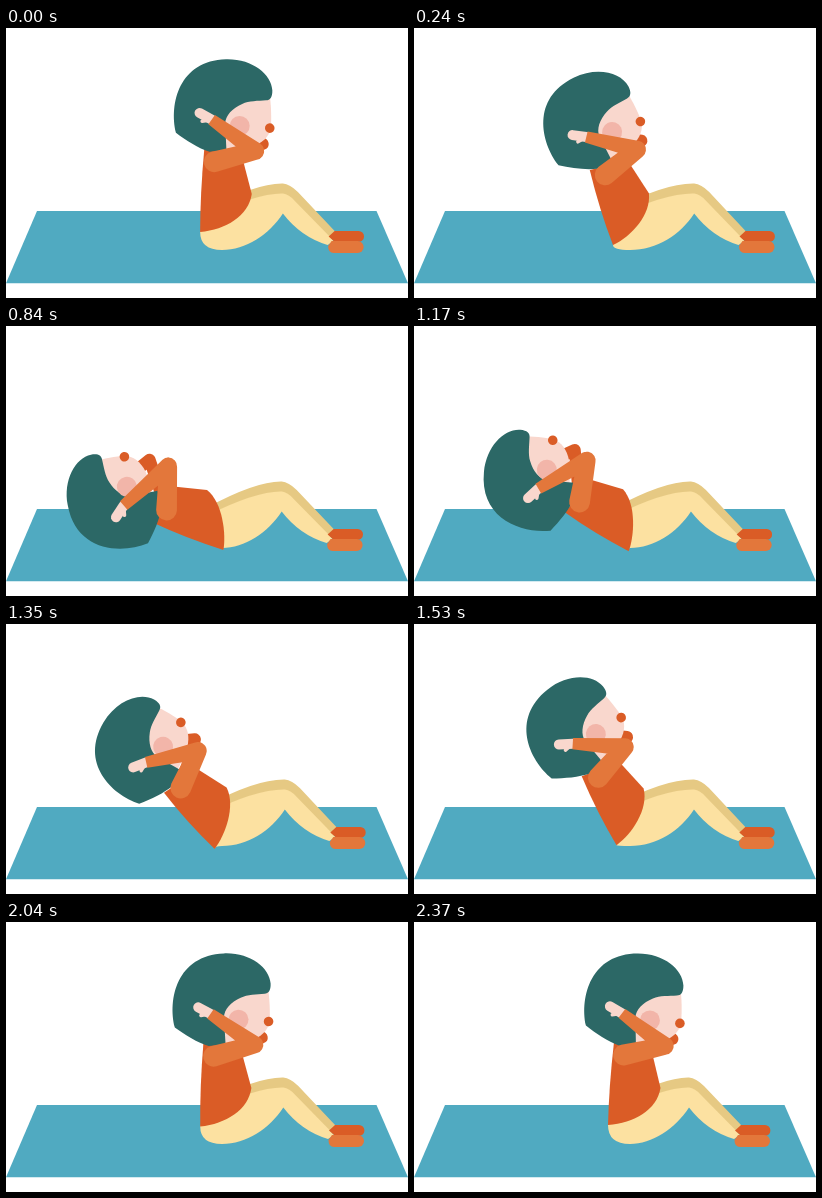
These frames come from a looping animation (402 px wide and 270 px high, 2.4 s). An HTML page:

```html
<!DOCTYPE html>
<html lang="en">
<head>
<meta charset="utf-8">
<title>Sit-ups</title>
<style>
  html, body { margin: 0; width: 100%; height: 100%; overflow: hidden; background: #fff; }
  svg { display: block; width: 100%; height: 100%; }
  .mat { fill: #50aac1; }
  .hair { fill: #2c6866; }
  .skin { fill: #f9d7cd; }
  .blush { fill: #f2b5a9; }
  .dark { fill: #da5c26; }
  .light { fill: #e3773b; }
  .shade { fill: #e6c983; }
  .cloth { fill: #fce1a1; }
  .line { fill: none; stroke-linejoin: round; }
  #far { stroke: #da5c26; stroke-width: 12; }
  #hand, #thumb { stroke: #f9d7cd; stroke-linecap: round; }
  #hand { stroke-width: 10; }
  #thumb { stroke-width: 3.5; }
</style>
</head>
<body>
<svg viewBox="0 0 402 270" preserveAspectRatio="none">
  <path class="mat" d="M31 183H370.5L402 255.3H0Z"/>
  <path id="backLeg" class="shade"/>
  <path id="frontLeg" class="cloth"/>
  <g id="feet">
    <path class="dark" d="M0 208.5L6 203H30a5.4 5.4 0 0 1 0 10.8H6Z"/>
    <path class="light" d="M3 213H29a6 6 0 0 1 0 12H5Q-.5 225 -.5 218Z"/>
  </g>
  <path id="far" class="line"/>
  <path id="torso" class="dark"/>
  <!-- head is drawn around the cheek -->
  <g id="head">
    <path class="skin" d="M-18 -28H31C32 -18 32 -5 31 3C29 12 22 18 12 21C4 23 -6 24 -16 24Z"/>
    <path id="hair" class="hair" d="M-64 5C-70 -24 -59 -67 -12 -67C14 -67 33 -51 33.5 -35C33.5 -28 31 -25 27 -25C19 -24.5 10 -25 3 -22C-7 -18 -14 -11 -14.5 -3L-14 24L-31 25C-42 21 -54 13 -64 5Z"/>
    <circle class="blush" r="10"/>
    <circle class="dark" cx="30" cy="3" r="4.8"/>
  </g>
  <path id="thumb" class="line"/>
  <path id="hand" class="line"/>
  <path id="arm" class="light"/>
</svg>
<script>
const LOOP = 2400, LEAD = 20;
const DOWN = 930, REST = 100, UP = 1160;
const MAX_LEAN = 80;
const HIP = [208, 212];

const set = (id, name, value) => document.getElementById(id).setAttribute(name, value);
const mix = (p, q, t) => p.map((v, i) => v + (q[i] - v) * t);

// Turns a local point anticlockwise and moves it to its origin
function place([x, y], [ox, oy], deg) {
  const a = deg * Math.PI / 180, c = Math.cos(a), s = Math.sin(a);
  return [ox + x * c + y * s, oy - x * s + y * c];
}

// 0 = sitting up, 1 = lying down
function recline(ms) {
  const t = (ms + LEAD) % LOOP;
  if (t < DOWN) return (t / DOWN) ** 1.13;
  const rise = Math.min(1, Math.max(0, (t - DOWN - REST) / UP));
  return (1 - rise) ** 1.75;
}

// Tapered capsule from p (radius r) to q (radius s); flat end at q if asked
function limb(p, q, r, s, flat) {
  const a = Math.atan2(q[1] - p[1], q[0] - p[0]);
  const nx = -Math.sin(a), ny = Math.cos(a);
  const at = (c, k) => [c[0] + nx * k, c[1] + ny * k];
  const end = flat ? `L${at(q, s)}` : `A${s} ${s} 0 0 1 ${at(q, s)}`;
  return `M${at(p, -r)}L${at(q, -s)}${end}L${at(p, r)}A${r} ${r} 0 0 1 ${at(p, -r)}Z`;
}

function drawLegs(k, f, seat) {
  set('backLeg', 'd',
    `M200 182Q250 155 ${k} 155.5Q${k + 7} 156 ${k + 15} 164L${f + 7} 204L${f} 210L${k} 180L200 200Z`);
  set('frontLeg', 'd',
    `M200 190Q250 165 ${k} 165.5Q${k + 6} 166 ${k + 12} 173L${f + 1} 208.5L${f + 5} 213L${f - 1} 217` +
    `Q${k + 18} 209 ${k} 185.5C${k - 14} 207 ${k - 37} 222 216 222Q${seat[0]} 222 ${seat}Z`);
  set('feet', 'transform', `translate(${f} 0)`);
}

function drawTorso(b) {
  const mid = mix(b.nape, b.seat, 0.5);
  set('torso', 'd',
    `M${b.nape}Q${mid[0] - 2} ${mid[1] + 2} ${b.seat}C${b.low} ${b.high} ${b.belly}L${b.chest}Z`);
}

function drawArms(shoulder, elbow, wrist, tip, farIn, farElbow) {
  const [wx, wy] = wrist, dx = tip[0] - wx, dy = tip[1] - wy;
  const thumb = [wx + dx * 0.55 + dy * 0.43, wy + dy * 0.55 - dx * 0.43];
  set('far', 'd', `M${farIn}L${farElbow}L${shoulder}`);
  set('hand', 'd', `M${tip}L${wrist}`);
  set('thumb', 'd', `M${wrist}L${thumb}`);
  set('arm', 'd', limb(shoulder, elbow, 10.4, 8.8) + limb(elbow, wrist, 8.8, 5.6, true));
}

function draw(ms) {
  const q = recline(ms), lean = q * MAX_LEAN;

  // The trunk turns about the hip and shortens as it curls
  const curl = 1 - (1 - q) ** 2.5;
  const trunk = (up, flat) => place(mix(up, flat, curl), HIP, lean * 0.84);
  const body = {
    nape: trunk([-8, -92], [-15.5, -60]),
    seat: trunk([-14, -9], [-6, 14]),
    low: trunk([12, -11], [9, 9]),
    high: trunk([35, -24], [35.5, -9]),
    belly: trunk([38.5, -46], [39, -29]),
    chest: trunk([28, -90], [27, -58])
  };
  const shoulder = trunk([1.5, -79], [2, -55]);

  // The head swings on an arc around the hip and tips back faster than the trunk
  const reach = 100 + 17 / (1 + (lean / 19) ** 2);
  const cheek = place([0, -reach], HIP, lean - 13.8);
  const turn = lean * 1.37;
  const near = (up, flat, t = q) => place(mix(up, flat, t), cheek, turn);

  // Knees and feet slide out and back during the move
  const slide = Math.sin(Math.PI * Math.sqrt(q));

  drawLegs(275 + 5.2 * slide, 321 + 4.5 * slide, body.seat);
  drawTorso(body);
  drawArms(
    shoulder,
    near([15, 25.5], [12, 48], q * q),
    near([-28, -7], [-17, -6.5]),
    near([-40, -14], [-27, -16.5]),
    near([20, 19], [16.5, 16.5]),
    near([22.5, 18.5], [22.5, 28])
  );
  set('head', 'transform', `translate(${cheek}) rotate(${-turn})`);
  set('hair', 'transform', `translate(${5 * q} ${6 * q})`);
}

const start = performance.now();
function tick() {
  draw(performance.now() - start);
  requestAnimationFrame(tick);
}
tick();
</script>
</body>
</html>
```
